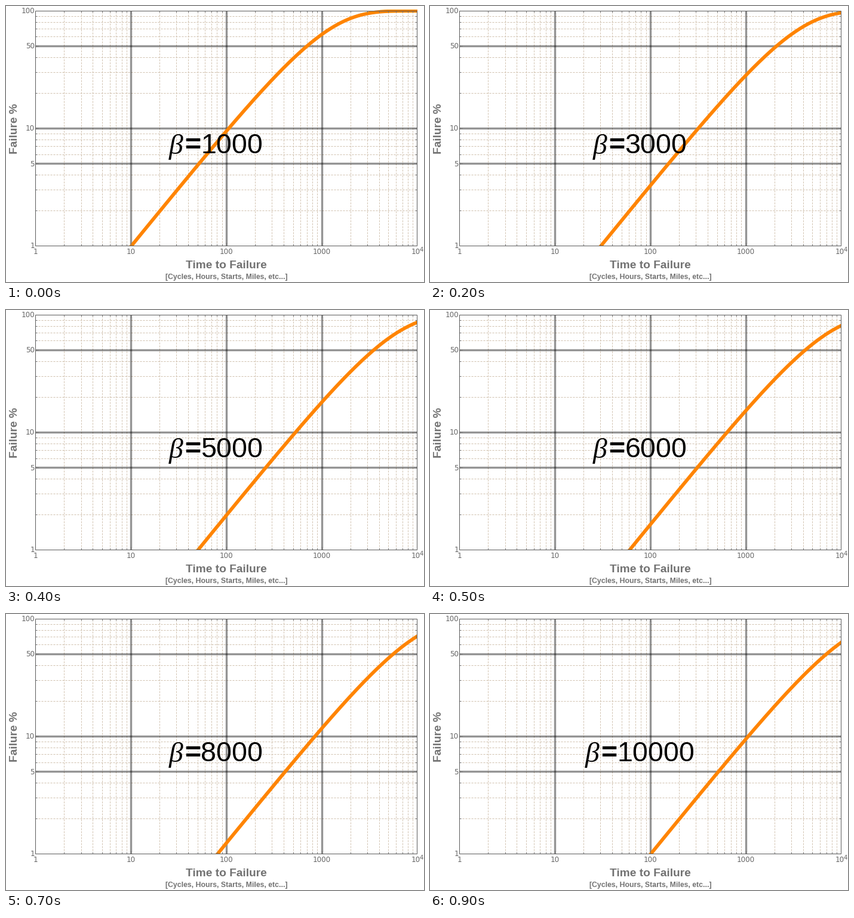
These frames come from a looping animation (700 by 463 pixels, 1 s). A matplotlib script:

```python
import numpy as np
import matplotlib.pyplot as plt
from matplotlib.animation import FuncAnimation
from matplotlib.patches import Rectangle

W, H, DPI = 700, 463, 100
PT = 72 / DPI
LEFT, RIGHT, TOP, BOTTOM = 49.8, 688.9, 8.2, 402.5
STEPS = 10

GREY = "#666666"
TITLE = "#727272"
MINOR = "#d0c1ae"
ORANGE = "#ff8400"

fig = plt.figure(figsize=(W / DPI, H / DPI), dpi=DPI, facecolor="white")
ax = fig.add_axes([0, 0, 1, 1])
ax.set_xlim(0, W)
ax.set_ylim(H, 0)
ax.axis("off")


def px(t):
    """Horizontal pixel of time t (four log decades)."""
    return LEFT + (RIGHT - LEFT) * np.log10(t) / 4


def py(percent):
    """Vertical pixel of a failure percentage (two log decades)."""
    return BOTTOM - (BOTTOM - TOP) * np.log10(percent) / 2


def crisp(v):
    """Centre of the pixel that holds v, so straight lines stay sharp."""
    return np.floor(v) + 0.5


def line(xs, ys, width=1.0, **style):
    return ax.plot(xs, ys, lw=width * PT, snap=False, **style)[0]


def label(x, y, text, size, family="DejaVu Sans", color=GREY, **style):
    return ax.text(x, y, text, fontsize=size * PT, family=family,
                   color=color, **style)


X0, X1, Y0, Y1 = (crisp(v) for v in (LEFT, RIGHT, TOP, BOTTOM))


def draw_grid():
    dashed = dict(color=MINOR, ls=(0, (3, 2)), zorder=1)
    major = dict(color="black", alpha=0.42, solid_capstyle="butt", zorder=2)
    tick = dict(color="#777777", solid_capstyle="butt", zorder=5)

    for decade in range(4):
        for k in range(1, 10):
            t = k * 10 ** decade
            if t == 1:
                continue
            x = crisp(px(t))
            if k == 1:
                line([x, x], [Y0, Y1], 3.4, **major)
            else:
                line([x, x], [Y1, Y0], **dashed)
            size = 5 if k == 1 else 3
            line([x, x], [Y1, Y1 - size], **tick)
            line([x, x], [Y0, Y0 + size], **tick)

    for decade in range(2):
        for k in range(1, 10):
            percent = k * 10 ** decade
            if percent == 1:
                continue
            y = crisp(py(percent))
            bold = percent in (5, 10, 50)
            if bold:
                line([X0, X1], [y, y], 3.4, **major)
            else:
                line([X0, X1], [y, y], **dashed)
            size = 5 if bold else 3
            line([X0, X0 + size], [y, y], **tick)
            line([X1, X1 - size], [y, y], **tick)

    ax.add_patch(Rectangle((X0, Y0), X1 - X0, Y1 - Y0, fill=False,
                           ec="#5c5c5c", lw=PT, snap=False, zorder=6))


def draw_labels():
    for t in (1, 10, 100, 1000):
        label(px(t), 416.5, str(t), 12, ha="center")
    label(678.5, 416.5, "10", 12)
    label(692.5, 411.5, "4", 10)
    for percent in (1, 5, 10, 50, 100):
        label(48, py(percent) + 3.9, str(percent), 12, ha="right")

    bold = dict(family="Liberation Sans", weight="bold", color=TITLE)
    label(368.6, 440, "Time to Failure", 19.1, ha="center", **bold)
    label(369.2, 458, "[Cycles, Hours, Starts, Miles, etc...]", 12.3,
          ha="center", **bold)
    label(23.5, 205.5, "Failure %", 19, rotation=90, ha="right", va="center",
          **bold)


draw_grid()
draw_labels()

times = np.logspace(0, 4, 600)
curve = line([], [], 5.8, color=ORANGE, zorder=4)
clip = Rectangle((X0, 6), X1 + 0.5 - X0, Y1 - 6, transform=ax.transData)
curve.set_clip_path(clip)

SANS = "Liberation Sans"
beta = label(0, 248.5, "β", 47.5, "Liberation Serif", "black",
             style="italic", zorder=8)
equals = label(0, 247, "=", 46.7, SANS, "black", weight="bold", zorder=8)
value = label(0, 247, "", 46.7, SANS, "black", zorder=8)


def update(i):
    scale = 1000 * (i + 1)
    curve.set_data(px(times), py(100 * (1 - np.exp(-times / scale))))
    digits = str(scale)
    value.set_text(digits)
    shift = 13 * (len(digits) - 4)
    for part, x in ((beta, 272.5), (equals, 299), (value, 326.3)):
        part.set_x(x - shift)
    return curve, beta, equals, value


anim = FuncAnimation(fig, update, frames=STEPS, interval=100, repeat=True,
                     repeat_delay=0, blit=False)
plt.show()
```
